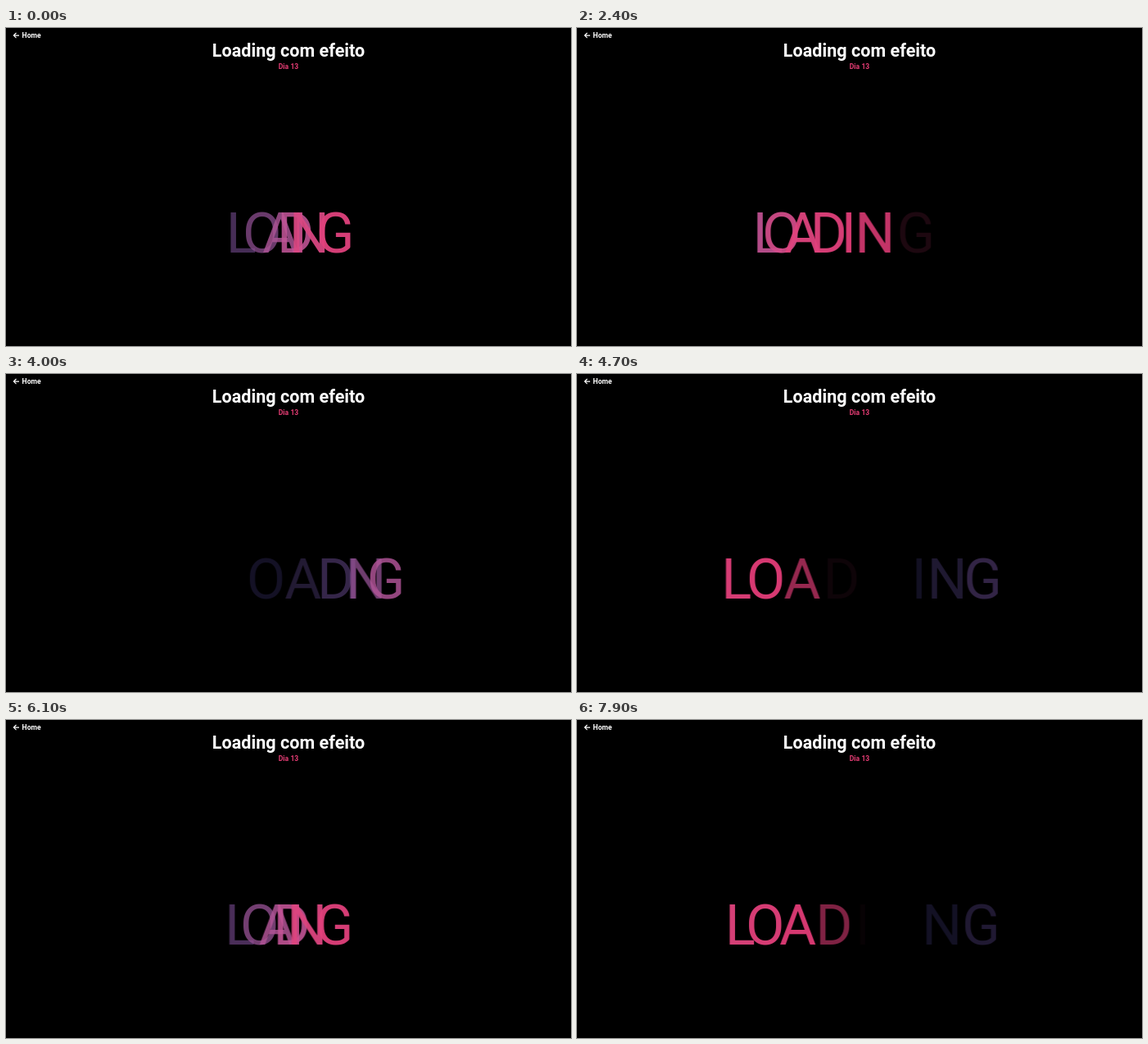
An HTML page for the animation above (8000 ms loop, 690x388 px).

```html
<!DOCTYPE html>
<html lang="pt-BR">
<head>
<meta charset="utf-8">
<title>Loading com efeito</title>
<style>
  html, body {
    margin: 0;
    width: 100%;
    height: 100%;
    overflow: hidden;
    background: #000;
    font-family: Roboto, sans-serif;
  }
  .stage { position: relative; width: 690px; height: 388px; overflow: hidden; }
  .head { position: absolute; left: 0; top: 0; font-weight: 700; }
  .word {
    position: absolute;
    left: -1.3px;
    top: 201.4px;
    width: 690px;
    text-align: center;
    white-space: nowrap;
    font-size: 69px;
    line-height: 100px;
    letter-spacing: -7.2px;
  }
  .word span { display: inline-block; will-change: transform; }
</style>
</head>
<body>
<div class="stage">
  <svg class="head" width="690" height="60" fill="#fff">
    <path d="M16 9.1H9.8M12.5 6L9.4 9.1l3.1 3.1" fill="none" stroke="#fff" stroke-width="1.2"/>
    <text x="19.6" y="12.2" font-size="8.62">Home</text>
    <text x="345" y="35.2" font-size="21.6" text-anchor="middle">Loading com efeito</text>
    <text x="345" y="50" font-size="8.62" text-anchor="middle" fill="#e33c73">Dia 13</text>
  </svg>
  <div class="word"></div>
</div>
<script>
  const LOOP = 8000, STEP = 100, FIRST = 150;
  const CYCLE = 3000, STAGGER = 220, START = 1000;
  const REACH = 29.5;

  // Share of the cycle, colour, opacity
  const tones = [
    [0, '227,60,120', 0],
    [0.027, '227,60,120', 0.13],
    [0.06, '227,60,120', 0.22],
    [0.08, '227,60,120', 0.56],
    [0.1, '227,60,120', 0.86],
    [0.16, '227,60,120', 0.95],
    [0.32, '222,67,125', 0.95],
    [0.46, '200,84,150', 0.91],
    [0.56, '175,84,150', 0.84],
    [0.63, '148,80,146', 0.77],
    [0.68, '118,72,140', 0.67],
    [0.78, '92,66,125', 0.58],
    [0.86, '75,58,115', 0.43],
    [0.93, '60,52,112', 0.33],
    [0.98, '50,50,105', 0.2],
    [1, '50,50,105', 0.1]
  ].map(([offset, rgb, a]) => ({ offset, color: `rgba(${rgb},${a})` }));

  const slide = [-REACH, REACH].map(x => ({ transform: `translateX(${x}px)` }));
  const swing = 'cubic-bezier(.5,-1.4,.5,2.4)';

  const word = document.querySelector('.word');
  const letters = [...'LOADING'].map(char => {
    const span = document.createElement('span');
    span.textContent = char;
    word.append(span);
    const play = (frames, easing) => {
      const anim = span.animate(frames, { duration: CYCLE, easing, fill: 'both' });
      anim.pause();
      return anim;
    };
    return [play(slide, swing), play(tones, 'linear')];
  });

  function draw(time) {
    letters.forEach((anims, i) => {
      const own = (time - START - i * STAGGER + 2 * CYCLE) % CYCLE;
      for (const anim of anims) anim.currentTime = own;
    });
  }

  const begin = performance.now();
  function tick() {
    const t = (performance.now() - begin) % LOOP;
    // The opening pose holds until the motion reaches it
    draw(Math.max(FIRST, Math.floor(t / STEP) * STEP));
    requestAnimationFrame(tick);
  }
  tick();
</script>
</body>
</html>
```
